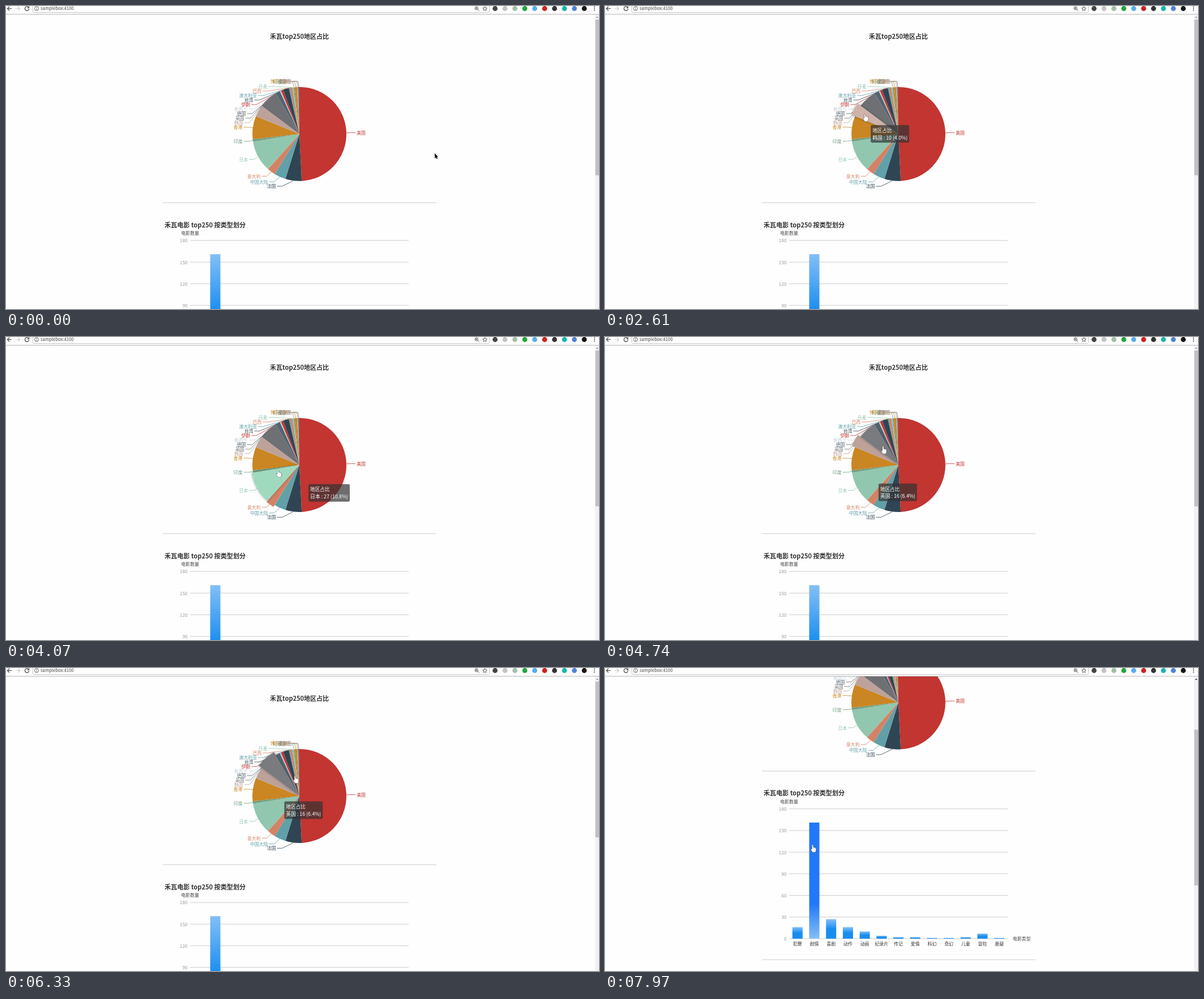
These frames come from a looping animation (1047 px wide and 535 px high, 8000 ms). An HTML page with a canvas:

```html
<!DOCTYPE html>
<html lang="zh-CN">
<head>
<meta charset="utf-8">
<style>
html, body { margin: 0; width: 100%; height: 100%; overflow: hidden; background: #fefefe; }
canvas { display: block; }
</style>
</head>
<body>
<canvas id="stage" width="1047" height="535"></canvas>
<script>
const ctx = document.getElementById('stage').getContext('2d');
const LOOP = 8000, STEP = 10, TAU = Math.PI * 2;
const CX = 518, CY = 226, R = 83, GROW = 6.3;
const BASE = 643.2, UNIT = 38.2 / 30, BAND = 386 / 13;
const SCROLL_START = 6720, SCROLL_EVERY = 135, SCROLL_BY = 55.1, SCROLLS = 3;
const FONT = '"Noto Sans CJK SC", "Noto Sans CJK", "Noto Sans", sans-serif';
const COLORS = ['#c23531', '#2f4554', '#61a0a8', '#d48265', '#91c7ae', '#749f83',
  '#ca8622', '#bda29a', '#6e7074', '#546570', '#c4ccd3'];

const parse = list => list.split(' ').map(s => [s.replace(/\d+/, ''), +s.match(/\d+/)[0]]);
const regions = parse('美国123 法国14 中国大陆10 意大利7 日本27 印度2 香港20 韩国10 英国16 德国4 ' +
  '新西兰1 伊朗2 台湾5 澳大利亚1 巴西2 丹麦1 阿根廷1 博茨瓦纳2 泰国1 爱尔兰1');
const genres = parse('犯罪16 剧情161 喜剧27 动作16 动画10 纪录片4 传记2 爱情2 科幻1 奇幻1 儿童2 冒险7 悬疑1');

// Labels sit on a circle; crowded ones stack 8px apart up to the top.
let sum = 0;
const slices = regions.map(([name, n], i) => {
  const from = sum / 250 * TAU - TAU / 4;
  sum += n;
  const to = sum / 250 * TAU - TAU / 4, mid = (from + to) / 2, dir = i ? -1 : 1;
  const natural = (R + 10) * Math.sin(mid);
  const dy = i ? Math.max(natural, 8 * (19 - i) - 116) : natural;
  const dx = dy > -91 ? Math.sqrt(101.2 ** 2 - dy * dy) : (R + 10) * Math.abs(Math.cos(mid)) + 12.5;
  return { name, n, from, to, mid, dir, x: CX + dir * dx, y: CY + dy, color: COLORS[i % COLORS.length] };
});

// time, x, y
const path = [[1310, 757, 260], [1310, 751, 254], [1460, 751, 254], [1650, 570, 180],
  [1840, 508, 198], [2250, 450, 205], [2750, 462, 185], [3150, 522, 155], [3430, 536, 183],
  [3900, 535, 265], [4150, 455, 220], [4600, 465, 278], [4690, 489, 194], [4740, 491, 193],
  [5200, 460, 190], [5410, 504, 205], [5570, 545, 221], [5800, 540, 270], [6000, 475, 275],
  [6150, 455, 215], [6330, 510, 190], [6550, 590, 272], [7130, 590, 272], [7700, 366.5, 312]];

function cursorAt(t) {
  const i = path.findIndex(p => p[0] > t);
  if (i < 1) return path[i < 0 ? path.length - 1 : 0].slice(1);
  const a = path[i - 1], b = path[i], k = (t - a[0]) / (b[0] - a[0]);
  return [a[1] + (b[1] - a[1]) * k, a[2] + (b[2] - a[2]) * k];
}

function sliceAt(x, y) {
  const dx = x - CX, dy = y - CY;
  if (Math.hypot(dx, dy) > R + GROW) return -1;
  const turn = (Math.atan2(dy, dx) + TAU * 1.25) % TAU - TAU / 4;
  return slices.findIndex(s => turn < s.to);
}

const scrollsAt = t => Math.max(0, Math.min(SCROLLS, Math.floor((t - SCROLL_START) / SCROLL_EVERY) + 1));

// The page reacts 50ms behind the pointer, and the tooltip trails after it.
const states = [];
let hover = -1, last = -1, since = 0, tip = null;
for (let t = 0; t < LOOP; t += STEP) {
  const [x, y] = cursorAt(Math.min(t - 50, SCROLL_START));
  const next = t < SCROLL_START ? sliceAt(x, y) : scrollsAt(t) < SCROLLS ? hover : -1;
  if (next !== hover) [last, hover, since] = [hover, next, t];
  const goal = [x + 12, y + 13], ease = 1 - Math.exp(-STEP / 150);
  if (tip) tip = tip.map((v, i) => v + (goal[i] - v) * ease);
  else if (hover >= 0) tip = goal;
  states.push({ hover, last, since, tip });
}

const elastic = k => k <= 0 ? 0 : k >= 1 ? 1
  : 1 + 2 ** (-10 * k) * Math.sin((k - 0.1) * TAU / 0.4);

const lift = hex => `rgb(${[1, 3, 5].map(i => Math.min(255, parseInt(hex.substr(i, 2), 16) * 1.1 | 0))})`;

function text(s, x, y, size, color, align = 'left', weight = 400) {
  ctx.font = `${weight} ${size}px ${FONT}`;
  ctx.textAlign = align;
  ctx.textBaseline = 'middle';
  ctx.fillStyle = color;
  ctx.fillText(s, x, y);
}

function rect(x, y, w, h, color) {
  ctx.fillStyle = color;
  ctx.fillRect(x, y, w, h);
}

function disc(x, y, r, color) {
  ctx.fillStyle = color;
  ctx.beginPath();
  ctx.arc(x, y, r, 0, TAU);
  ctx.fill();
}

function stroke(d, color, width = 1) {
  ctx.strokeStyle = color;
  ctx.lineWidth = width;
  ctx.stroke(new Path2D(d));
}

function drawPie(t, { hover, last, since }) {
  for (const { name, x, y, mid, dir, color } of slices) {
    const ex = CX + R * Math.cos(mid), ey = CY + R * Math.sin(mid);
    stroke(`M${x - 2 * dir} ${y}H${x - 11 * dir}L${ex} ${ey}`, color, 0.8);
    text(name, x, y, 7.9, color, dir < 0 ? 'right' : 'left');
  }
  const k = elastic((t - since) / 300);
  const order = slices.map((s, i) => i).sort((a, b) => (a === hover) - (b === hover));
  for (const i of order) {
    const s = slices[i], hot = i === hover;
    ctx.save();
    if (hot) {
      ctx.shadowBlur = 4;
      ctx.shadowColor = 'rgba(0,0,0,.35)';
    }
    ctx.fillStyle = hot ? lift(s.color) : s.color;
    ctx.beginPath();
    ctx.moveTo(CX, CY);
    ctx.arc(CX, CY, R + GROW * (hot ? k : i === last ? 1 - k : 0), s.from, s.to);
    ctx.fill();
    ctx.restore();
  }
}

const barX = i => 325 + BAND * (i + 0.5);

function drawBars(active) {
  text('电影数量', 325, 401, 7.9, '#444', 'center');
  text('电影类型', 720, BASE, 7.9, '#444');
  for (let v = 0; v <= 180; v += 30) {
    const y = BASE - v * UNIT;
    rect(325, y - 0.5, 386, 1, '#ccc');
    text(v, 320.5, y + 0.3, 8.2, '#999', 'right');
  }
  genres.forEach(([name, n], i) => {
    const x = barX(i), h = n * UNIT, hot = i === active;
    const g = ctx.createLinearGradient(0, BASE - h, 0, BASE);
    g.addColorStop(0, hot ? '#2378f7' : '#83bff6');
    g.addColorStop(hot ? 0.7 : 0.5, hot ? '#2378f7' : '#188df0');
    g.addColorStop(1, hot ? '#83bff6' : '#188df0');
    rect(x - 9, BASE - h, 18, h, g);
    text(name, x, 652.3, 7.9, '#333', 'center');
  });
}

function drawTip(t, { hover, last, since, tip }) {
  const shown = hover >= 0 ? 1 : Math.min(1, (since + 240 - t) / 100);
  if (!tip || shown <= 0) return;
  const s = slices[hover < 0 ? last : hover], [x, y] = tip;
  const line = `${s.name} : ${s.n} (${(s.n / 2.5).toFixed(1)}%)`;
  ctx.globalAlpha = shown;
  ctx.font = `400 8.8px ${FONT}`;
  ctx.fillStyle = 'rgba(50,50,50,.7)';
  ctx.beginPath();
  ctx.roundRect(x, y, ctx.measureText(line).width + 6, 31, 2.7);
  ctx.fill();
  text('地区占比', x + 3, y + 9.5, 8.6, '#fff');
  text(line, x + 3, y + 22, 8.8, '#fff');
  ctx.globalAlpha = 1;
}

function drawBrowser(scroll) {
  rect(0, 0, 1047, 14, '#fefefe');
  rect(0, 14, 1047, 1, '#b6b6b6');
  stroke('M10 4.5H2.5M6 1L2.5 4.5L6 8', '#444', 1.2);
  stroke('M17 4.5H24.5M21 1L24.5 4.5L21 8', '#ccc', 1.2);
  stroke('M39.8 2.2A3.6 3.6 0 1 0 40.6 5M40.5 0.5V3.5H37.5', '#444', 1.2);
  stroke('M47.5 0V9.5Q47.5 11.5 49.5 11.5H851.5Q853.5 11.5 853.5 9.5V0', '#c4c4c4');
  stroke('M50.5 4.5a3.5 3.5 0 1 0 7 0a3.5 3.5 0 1 0 -7 0M54 4V6.6M54 2.3V3.2', '#555', 0.9);
  text('samplebox:4100', 61, 4.5, 7.7, '#444');
  stroke('M828 4a2.7 2.7 0 1 0 5.4 0a2.7 2.7 0 1 0 -5.4 0M832.8 6L835.5 8.7M829.3 4H832.1M830.7 2.6V5.4', '#444', 0.9);
  let star = '';
  for (let i = 0; i < 10; i++) {
    const a = TAU * (i / 10 - 0.25), r = i % 2 ? 1.9 : 4;
    star += `${i ? 'L' : 'M'}${845.5 + r * Math.cos(a)} ${4.8 + r * Math.sin(a)}`;
  }
  stroke(star + 'Z', '#444', 0.9);
  ['#444', '#c4c4c4', '#a3bfa5', '#20a53a', '#55aee8', '#d01f1f', '#333', '#16b5ad', '#4f83d9', '#151515']
    .forEach((c, i) => disc(863.5 + 17.5 * i, 4.5, 4.4, c));
  for (let i = 0; i < 3; i++) disc(1039, 1.5 + 3 * i, 0.9, '#444');

  rect(1040, 15, 7, 520, '#f1f1f1');
  rect(1040.5, Math.round(24 + 0.516 * scroll), 6.5, 275, '#c1c1c1');
  ctx.fillStyle = scroll ? '#505050' : '#a3a3a3';
  ctx.fill(new Path2D('M1043.7 18.2L1046 21H1041.4Z'));
}

const ARROW = new Path2D('M0 0V9L2.1 7.2L3.5 10.2L5 9.5L3.6 6.6H6Z');
const HAND = new Path2D('M-1 1Q0 -.8 1 1V5Q2 4 3 5.2Q4 4.5 4.7 5.8Q6 5.5 6 7V10Q5.7 12 4.8 13.2H0Q-1.5 11 -3 8.7Q-3.2 7 -1 8Z');

function drawCursor(x, y, hand) {
  ctx.save();
  ctx.translate(x, y);
  ctx.lineWidth = 0.9;
  ctx.strokeStyle = hand ? '#222' : '#fff';
  ctx.fillStyle = hand ? '#fff' : '#000';
  ctx.stroke(hand ? HAND : ARROW);
  ctx.fill(hand ? HAND : ARROW);
  ctx.restore();
}

function draw(t) {
  const state = states[Math.floor(t / STEP)];
  const scroll = SCROLL_BY * scrollsAt(t);
  const [x, y] = cursorAt(t);
  const onBar = scroll > 0 && Math.abs(x - barX(1)) < 9;
  rect(0, 0, 1047, 535, '#fefefe');
  ctx.save();
  ctx.translate(0, -scroll);
  text('禾瓦top250地区占比', CX, 54, 11, '#333', 'center', 700);
  drawPie(t, state);
  rect(277, 346.8, 483, 1, '#ccc');
  text('禾瓦电影 top250 按类型划分', 280, 386.5, 11.1, '#333', 'left', 700);
  drawBars(onBar ? 1 : -1);
  rect(277, 679.8, 483, 1, '#ccc');
  drawTip(t, state);
  ctx.restore();
  drawBrowser(scroll);
  drawCursor(x, y, onBar || (state.hover >= 0 && !scroll));
}

const start = performance.now();
function tick() {
  draw((performance.now() - start) % LOOP);
  requestAnimationFrame(tick);
}
tick();
</script>
</body>
</html>
```
